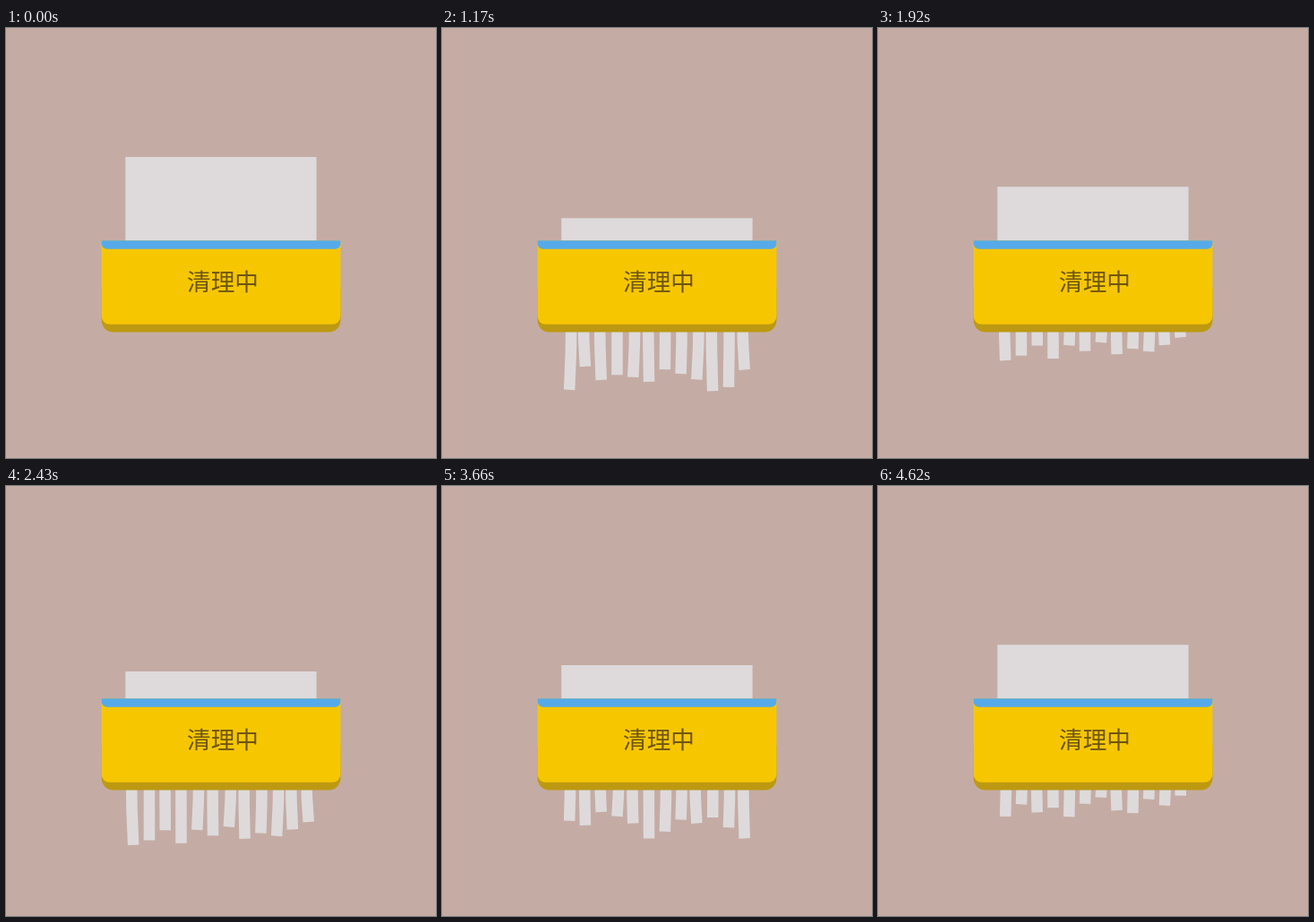
Recreate the animation shown at these times as an HTML page with a canvas. Size 480 px wide and 480 px high, loop 4.65 s.

```html
<!DOCTYPE html>
<html lang="zh">
<head>
<meta charset="utf-8">
<style>
  html, body { margin: 0; height: 100%; overflow: hidden; background: #c4aca4; }
  canvas { display: block; }
</style>
</head>
<body>
<canvas width="480" height="480"></canvas>
<script>
const ctx = document.querySelector('canvas').getContext('2d');
const LOOP = 4650, CYCLE = 1350, SPEED = 0.0582;
const PAPER = '#dedadc', STRIPS = 12;
const LEFT = 133.3, WIDTH = 213.3, PITCH = WIDTH / STRIPS;

// Repeatable random number in 0..1
function random(seed) {
  const x = Math.sin(seed * 12.9898) * 43758.5453;
  return x - Math.floor(x);
}

function box(color, x, y, w, h, radii = 0) {
  ctx.fillStyle = color;
  ctx.beginPath();
  ctx.roundRect(x, y, w, h, radii);
  ctx.fill();
}

// A strip leaves the machine upright and curls sideways as it grows
function drawStrip(sheet, i, t) {
  const seed = sheet * STRIPS + i + 1;
  const end = 308 + 30 * random(seed) + t * SPEED;
  if (end <= 338) return;
  const bend = 6 * (random(seed + 100) - 0.5) * t / CYCLE;
  const x = LEFT + PITCH * (i + 0.5);
  ctx.beginPath();
  ctx.moveTo(x + bend, 320);
  ctx.quadraticCurveTo(x + bend, (320 + end) / 2, x, end);
  ctx.stroke();
}

function drawMachine() {
  box('#bd9912', 106.7, 290, 266.7, 49.5, [0, 0, 13, 13]);
  box('#f6c700', 106.7, 237.3, 266.7, 93.5, [0, 0, 9, 9]);
  box('#56aaea', 106.7, 237.3, 266.7, 9.4, [0, 0, 6, 6]);
  ctx.fillStyle = '#6e5412';
  ctx.font = '26.67px "Noto Sans CJK SC", "Noto Sans CJK", sans-serif';
  ctx.textAlign = 'center';
  ctx.fillText('清理中', 242, 292.7);
}

function draw(now) {
  const time = now % LOOP;
  const t = time % CYCLE;
  const top = 144 + t * SPEED;

  box('#c4aca4', 0, 0, 480, 480);
  ctx.strokeStyle = PAPER;
  ctx.lineWidth = 12.5;
  for (let i = 0; i < STRIPS; i++) drawStrip(Math.floor(time / CYCLE), i, t);
  box(PAPER, LEFT, top, WIDTH, 260 - top);
  drawMachine();
  requestAnimationFrame(draw);
}
requestAnimationFrame(draw);
</script>
</body>
</html>
```
